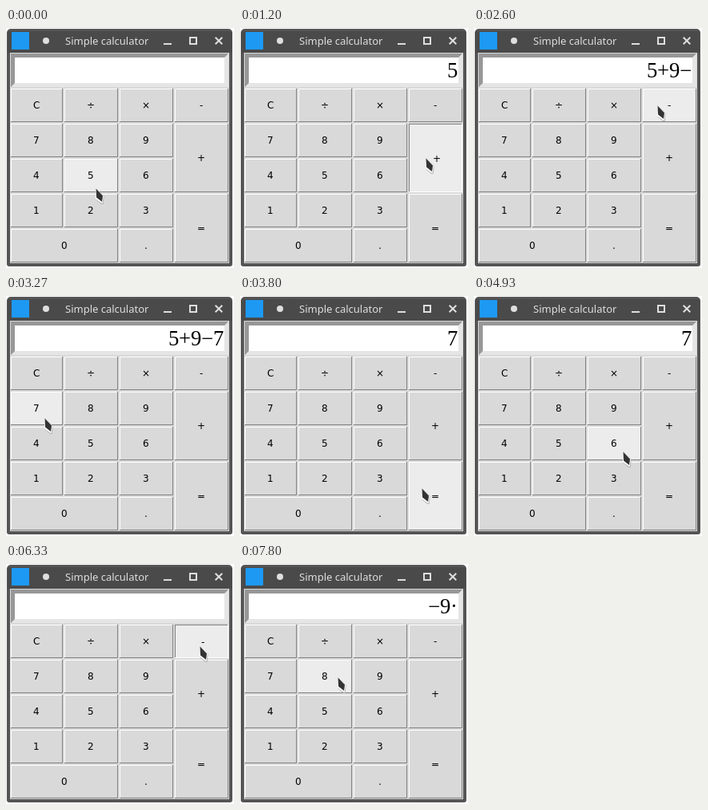
Recreate the animation shown at these times as an HTML page with a canvas. Size 285 by 301 pixels, loop 8000 ms.

```html
<!DOCTYPE html>
<html lang="en">
<head>
<meta charset="utf-8">
<title>Simple calculator</title>
<style>
  html, body { margin: 0; width: 100%; height: 100%; overflow: hidden; background: #fff; }
  canvas { display: block; }
</style>
</head>
<body>
<canvas id="stage" width="285" height="301"></canvas>
<script>
const ctx = document.getElementById('stage').getContext('2d');
const LOOP = 8000, TICKS_PER_MS = 0.015, TRAVEL = 5;
const FACE = '#d9d9d9', ACTIVE_FACE = '#ececec', LIGHT = '#fff', SHADE = '#828282';

// A repeated label spans several cells.
const layout = ['C÷×-', '789+', '456+', '123=', '00.='];
const buttons = [...new Set(layout.join(''))].map(label => {
  const rows = layout.filter(row => row.includes(label));
  const top = layout.indexOf(rows[0]);
  const left = rows[0].indexOf(label), right = rows[0].lastIndexOf(label);
  const x = Math.max(6, 4 + 69 * left);
  return { label, x, y: 76 + 44 * top, w: 71 + 69 * right - x, h: 44 * rows.length - 2 };
});

// Where the pointer stops, in ticks: x, y, arrival, then key, press and release.
const stops = [
  [112, 201, 0, '5', 4, 6],
  [232, 163, 13, '+', 17, 19],
  [180, 152, 23, '9', 27, 30],
  [229, 97, 35, '-', 36, 38],
  [48, 153, 44, '7', 47, 49],
  [227, 241, 54, '=', 55, 57],
  [186, 195, 74],
  [45, 98, 81, 'C', 83, 85],
  [120, 138, 91],
  [242, 103, 95, '-', 95, 97],
  [188, 157, 99, '9', 102, 104],
  [176, 104, 109, '×', 110, 112],
  [122, 142, 117]
].map(([x, y, arrive, key, down, up = arrive]) => ({ x, y, arrive, key, down, up }));

function pointerAt(tick) {
  const i = stops.findIndex(stop => tick < stop.arrive);
  if (i < 0) return stops[stops.length - 1];
  const from = stops[i - 1], to = stops[i];
  const leave = Math.max(from.up, to.arrive - TRAVEL);
  const p = Math.max(0, (tick - leave) / (to.arrive - leave));
  const mix = (a, b) => Math.round(a + (b - a) * p);
  return { x: mix(from.x, to.x), y: mix(from.y, to.y) };
}

function enter(value, key) {
  if (key === 'C') return '';
  if (key === '=') {
    const terms = value.replace(/−/g, '-').match(/[+-]?\d+/g);
    return String(terms.reduce((sum, term) => sum + Number(term), 0));
  }
  return value + ({ '-': '−', '×': '·' }[key] || key);
}

function rect(color, x, y, w, h) {
  ctx.fillStyle = color;
  ctx.fillRect(x, y, w, h);
}

function polygon(color, points) {
  ctx.fillStyle = color;
  ctx.beginPath();
  points.forEach(([x, y]) => ctx.lineTo(x, y));
  ctx.fill();
}

// Glyphs advance by whole pixels; align is 0 for left, 0.5 for centre, 1 for right.
function pixelText(string, x, y, font, align) {
  ctx.font = font;
  ctx.fillStyle = '#000';
  const advance = glyph => Math.round(ctx.measureText(glyph).width);
  const width = [...string].reduce((sum, glyph) => sum + advance(glyph), 0);
  let left = Math.floor(x - width * align);
  for (const glyph of string) {
    ctx.fillText(glyph, left, y);
    left += advance(glyph);
  }
}

function drawWindow() {
  rect('#fff', 0, 0, 285, 301);
  ctx.fillStyle = '#555';
  ctx.beginPath();
  ctx.roundRect(1, 1, 282, 298, [5, 5, 3, 3]);
  ctx.fill();
  rect('#4a4a4a', 2, 4, 280, 27);
  rect(FACE, 5, 31, 274, 264);

  rect('#1d99f3', 7, 5, 22, 22);
  ctx.fillStyle = ctx.strokeStyle = '#dedede';
  ctx.font = '13px "Noto Sans", sans-serif';
  ctx.fillText('Simple calculator', 74, 21);
  ctx.fillRect(197, 19, 10, 2);
  ctx.lineWidth = 2;
  ctx.strokeRect(230, 12, 8, 8);
  ctx.beginPath();
  ctx.arc(50, 16, 4, 0, Math.PI * 2);
  ctx.fill();
  ctx.beginPath();
  for (const side of [-4.3, 4.3]) {
    ctx.moveTo(266 - side, 11.7);
    ctx.lineTo(266 + side, 20.3);
  }
  ctx.stroke();
}

function drawDisplay(value) {
  rect('#e5e5e5', 6, 32, 272, 42);
  polygon('#979797', [[6, 32], [278, 32], [273, 37], [11, 37], [11, 69], [6, 74]]);
  rect('#fff', 11, 37, 262, 32);
  pixelText(value, 272, 62, '26.67px "Liberation Serif", serif', 1);
}

function drawButton({ label, x, y, w, h }, hovered, pressed) {
  rect(pressed ? LIGHT : SHADE, x, y, w, h);
  rect(pressed ? SHADE : LIGHT, x, y, w - 1, h - 1);
  rect(hovered || pressed ? ACTIVE_FACE : FACE, x + 1, y + 1, w - 2, h - 2);
  const dx = pressed ? 2 : 0, dy = pressed ? 1 : 0;
  pixelText(label, x + w / 2 + dx, y + h / 2 + 4 + dy, '12px "DejaVu Sans", sans-serif', 0.5);
}

function drawPointer({ x, y }) {
  ctx.save();
  ctx.translate(x, y);
  polygon('#aaa', [[0, 0], [10.5, 10], [9.5, 20], [7.5, 20], [0, 14]]);
  polygon('#fff', [[0, 0], [10, 10], [8.5, 19.5], [0, 13.5]]);
  polygon('#333', [[0.5, 0.5], [9, 9.5], [8, 17], [1, 11.5]]);
  ctx.restore();
}

function frame() {
  // The screen updates 15 times a second; the offset covers rounded timestamps.
  const time = performance.now() % LOOP;
  const tick = Math.floor((time + 4) * TICKS_PER_MS);
  const pointer = pointerAt(tick);
  const keyed = stops.filter(stop => stop.key);
  const value = keyed.filter(stop => tick >= stop.up).reduce((v, stop) => enter(v, stop.key), '');
  const active = keyed.find(stop => tick >= stop.down && tick < stop.up);

  drawWindow();
  drawDisplay(value);
  for (const b of buttons) {
    const hovered = pointer.x >= b.x && pointer.x < b.x + b.w &&
                    pointer.y >= b.y && pointer.y < b.y + b.h;
    drawButton(b, hovered, active?.key === b.label);
  }
  drawPointer(pointer);
  requestAnimationFrame(frame);
}
frame();
</script>
</body>
</html>
```
